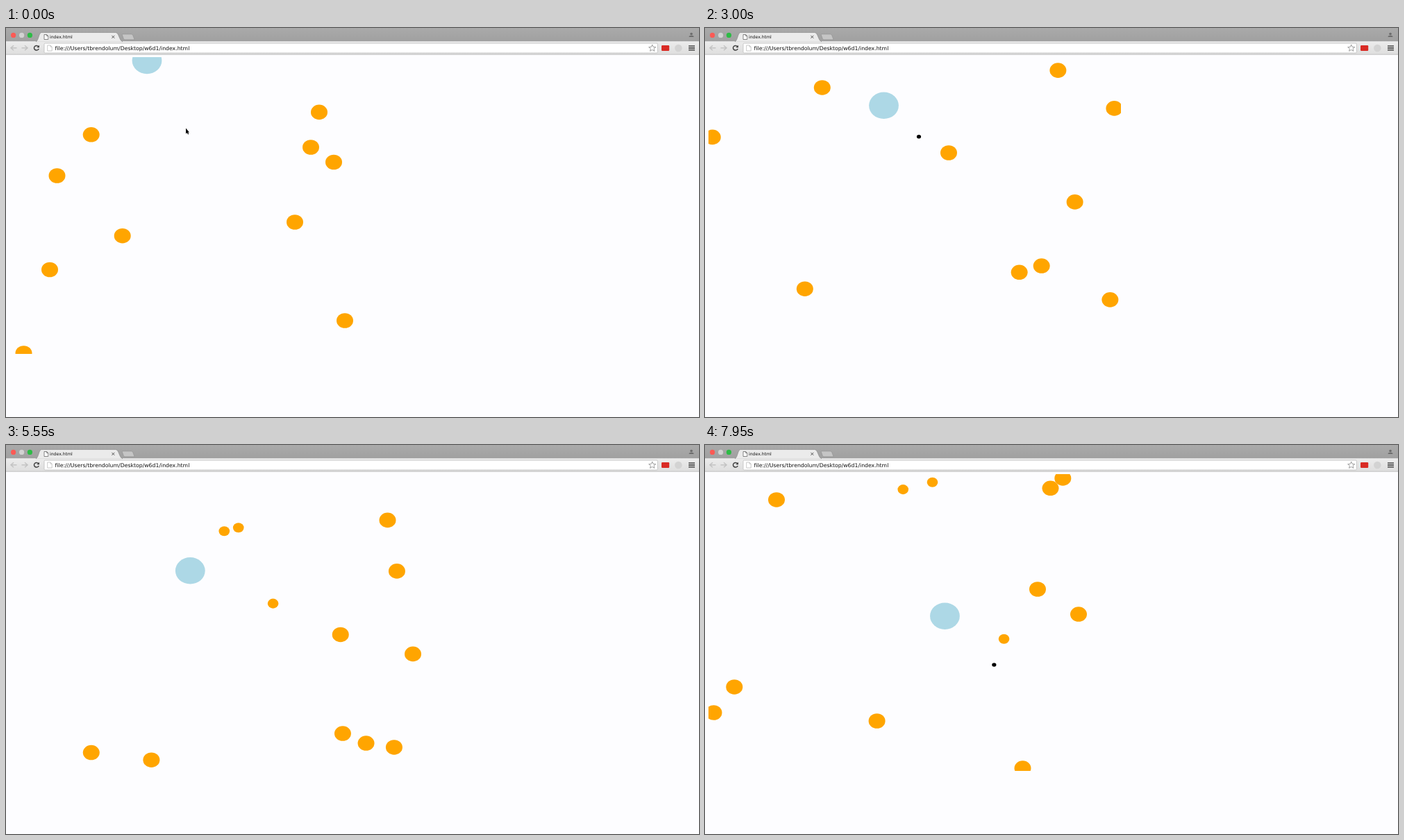
Write an HTML page with a canvas that moves like this. It is 998 by 561 pixels and loops after 8000 ms.

```html
<!DOCTYPE html>
<html lang="en">
<head>
<meta charset="utf-8">
<title>index.html</title>
<style>
  html, body { margin: 0; width: 100%; height: 100%; overflow: hidden; background: #fdfdff; }
  svg, canvas { position: absolute; left: 0; top: 0; }
  text { font-family: "DejaVu Sans", sans-serif; fill: #111; }
</style>
</head>
<body>
<svg width="998" height="561" viewBox="0 0 998 561">
  <defs>
    <linearGradient id="titleBar" x2="0" y2="1">
      <stop offset="0" stop-color="#aaa"/><stop offset="1" stop-color="#a0a0a0"/>
    </linearGradient>
    <linearGradient id="toolbar" x2="0" y2="1">
      <stop offset="0" stop-color="#ececec"/><stop offset="1" stop-color="#dedede"/>
    </linearGradient>
  </defs>
  <rect width="998" height="19.5" fill="url(#titleBar)"/>
  <rect y="19.5" width="998" height="18.5" fill="url(#toolbar)"/>
  <path d="M0 38.2H998" stroke="#b4b4b4" stroke-width=".8"/>

  <circle cx="10.6" cy="10.4" r="3.6" fill="#fc5a55"/>
  <circle cx="22.6" cy="10.4" r="3.6" fill="#d2d2d2"/>
  <circle cx="34.4" cy="10.4" r="3.6" fill="#2dbb45"/>

  <path d="M43 19.6C47 19 47 7 51 6.5H158C163 7 163 19 168 19.6Z" fill="#ebebeb" stroke="#858585" stroke-width=".6"/>
  <rect x="44" y="19.2" width="123" height="1.5" fill="#ebebeb"/>
  <path d="M167 9H180.5Q182 9 182.7 10.5L185 16.8H171.5Q170 16.8 169.3 15.3Z" fill="#c5c5c5" stroke="#8b8b8b" stroke-width=".5"/>
  <path d="M55 9.5H58.7L60.7 11.5V16.5H55ZM58.7 9.5V11.5H60.7" fill="#fff" stroke="#555" stroke-width=".7"/>
  <text x="63" y="15.2" font-size="6.17">index.html</text>
  <path d="M152.4 10.9L156.3 14.8M156.3 10.9L152.4 14.8" stroke="#555" stroke-width="1"/>
  <g fill="#6c6c6c"><circle cx="987" cy="8.5" r="1.8"/><path d="M983.5 13Q983.5 10.8 987 10.8T990.5 13Z"/></g>

  <g fill="none" stroke="#c3c3c3" stroke-width="1.5">
    <path d="M15.5 28.8H7M11 25.3L7 28.8L11 32.3"/>
    <path d="M22.5 28.8H31M27 25.3L31 28.8L27 32.3"/>
    <path d="M46.8 26.8A3.5 3.3 0 1 0 47.2 30" stroke="#444"/>
  </g>
  <path d="M48 24.7V28.3H44.3Z" fill="#444"/>

  <rect x="55" y="22" width="883.5" height="14" rx="1.5" fill="#fff" stroke="#bdbdbd" stroke-width=".8"/>
  <path d="M59.7 25H64L66.2 27.2V33H59.7ZM64 25V27.2H66.2" fill="#fff" stroke="#bcbcbc" stroke-width=".8"/>
  <text x="70.6" y="31.6" font-size="7.75">file:///Users/tbrendolum/Desktop/w6d1/index.html</text>
  <path d="M930.7 24L932.1 27.3L935.7 27.6L933 29.9L933.8 33.3L930.7 31.5L927.6 33.3L928.4 29.9L925.7 27.6L929.3 27.3Z" fill="#fff" stroke="#777" stroke-width=".7"/>
  <rect x="944" y="25" width="11.2" height="8" rx="1.2" fill="#d92b25"/>
  <circle cx="968.3" cy="29" r="5.3" fill="#d3d3d3"/>
  <path d="M983 26H992M983 28.9H992M983 31.8H992" stroke="#444" stroke-width="1.6"/>
</svg>
<canvas id="stage" width="998" height="561"></canvas>
<script>
const ctx = document.getElementById('stage').getContext('2d');
const LOOP = 8, TICK = 0.05;
const field = { x: 5, y: 42, w: 594, h: 428 };
const UNIT_X = 30.3, UNIT_Y = 27.25;

// start x, start y, velocity x, velocity y (pixels per second)
const rocks = [
  [122.7, 153.8, 15.92, -23.43],
  [73.5, 213, -21.67, -19.21],
  [167.7, 299.7, -8.25, 26.42],
  [63, 348.5, -25.43, 14.98],
  [25.5, 469, -10.39, 25.88],
  [451, 121.4, 19.82, -20.83],
  [472, 193.5, 20.94, 19.82],
  [416, 280, 12.66, 24.98],
  [488, 422, -1.15, -27.28]
];
const doomedRock = [439, 172, -30.4, 2.76];
const hitTime = 3.3, hitPoint = [341.5, 180.7];
const shards = [[-12.1, -25.07], [-3.01, -27.3], [19.15, 21.3]];

// reference time, x, y, time fired, time gone
const bullets = [
  [3, 308, 156.7, 1.8, hitTime],
  [6.65, 321.7, 231.8, 6.1, LOOP]
];

// the game lags slightly during its first three seconds
const gameTime = t => t - 0.035 * Math.min(t, 3);
const since = (g, start) => Math.max(0, g - start);
const wrap = (v, min, size) => min + (((v - min) % size) + size) % size;

function oval(x, y, rx, color) {
  ctx.fillStyle = color;
  ctx.beginPath();
  ctx.ellipse(x, y, rx, rx * 0.9, 0, 0, Math.PI * 2);
  ctx.fill();
}

function drawRock([x, y, vx, vy], g, rx = 12) {
  oval(wrap(x + vx * g, field.x, field.w), wrap(y + vy * g, field.y, field.h), rx, '#ffa500');
}

function drawShip(g) {
  const x = 203 + UNIT_X * (since(g, 1.079) - since(g, 2.878) + since(g, 5.188) + since(g, 7.6));
  const y = 47 + UNIT_Y * since(g, 0.517);
  oval(x, y, 21.4, '#add8e6');
}

function drawCursor() {
  ctx.fillStyle = '#000';
  ctx.fill(new Path2D('M259 144.6V152.4L260.8 150.9L262 153.5L263.2 153L262.1 150.4H264Z'));
}

function draw(t) {
  const g = gameTime(t);
  ctx.clearRect(0, 0, 998, 561);
  ctx.save();
  ctx.beginPath();
  ctx.rect(field.x, field.y, field.w, field.h);
  ctx.clip();
  rocks.forEach(rock => drawRock(rock, g));
  if (t < hitTime - 1e-6) drawRock(doomedRock, g);
  else shards.forEach(v => drawRock([...hitPoint, ...v], t - hitTime, 7.8));
  for (const [at, x, y, from, to] of bullets) {
    if (t >= from && t < to - 1e-6) oval(x + 72.8 * (t - at), y + 65.5 * (t - at), 3.1, '#000');
  }
  drawShip(g);
  ctx.restore();
  if (t < 0.55) drawCursor();
}

const startTime = performance.now();
function frame() {
  const t = ((performance.now() - startTime) / 1000) % LOOP;
  draw(Math.floor(t / TICK + 1e-6) * TICK);
  requestAnimationFrame(frame);
}
frame();
</script>
</body>
</html>
```
